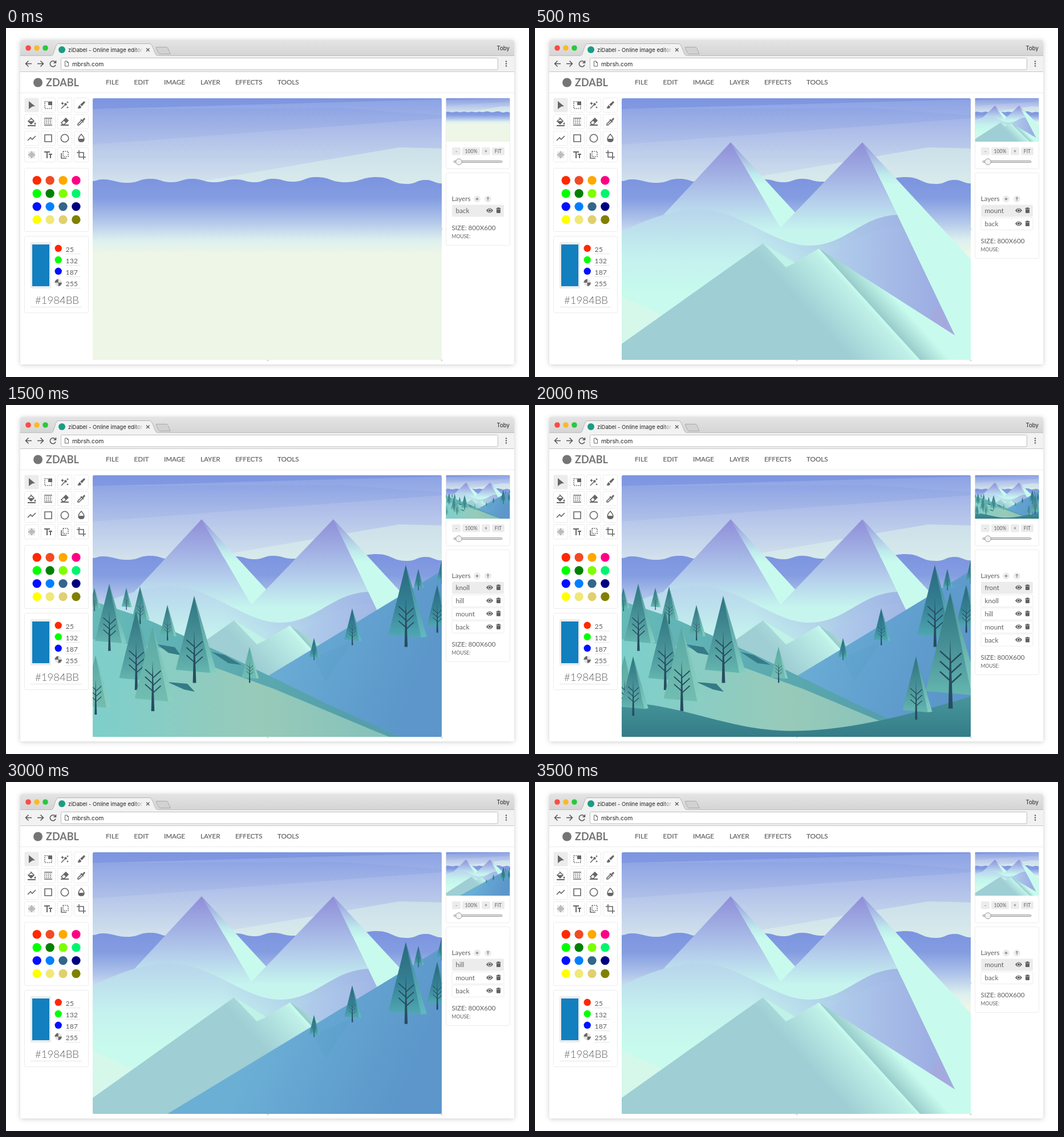
An HTML page for the animation above (4000 ms loop, 917 by 611 pixels).

```html
<!DOCTYPE html>
<html lang="en">
<meta charset="utf-8">
<title>Image editor</title>
<style>
html, body { margin: 0; width: 100%; height: 100%; overflow: hidden; background: #fff }
svg { display: block; font-family: Lato, sans-serif; fill: #616161 }
.chrome { font-family: Inter, sans-serif; fill: #222 }
.panel { fill: #fff; stroke: #ececec }
.soft { fill: #ececec }
.icon { fill: none; stroke: #666; stroke-width: 1.6 }
.icon .f { fill: #666; stroke: none }
.icon .d { stroke-dasharray: 1.8 1.6 }
</style>
<svg id="stage" width="917" height="611" viewBox="0 0 917 611"></svg>
<script>
const stage = document.getElementById('stage');
let defs = '';

// Helpers: each returns SVG markup
const gradient = (id, x1, y1, x2, y2, ...stops) => {
  defs += `<linearGradient id="${id}" gradientUnits="userSpaceOnUse" x1="${x1}" y1="${y1}" x2="${x2}" y2="${y2}">` +
    stops.map(([at, color, alpha = 1]) => `<stop offset="${at}" stop-color="${color}" stop-opacity="${alpha}"/>`).join('') +
    '</linearGradient>';
  return `url(#${id})`;
};
const poly = (points, fill, more = '') => `<polygon points="${points}" fill="${fill}" ${more}/>`;
const path = (d, fill = 'none', more = '') => `<path d="${d}" fill="${fill}" ${more}/>`;
const dot = (x, y, r, fill, more = '') => `<circle cx="${x}" cy="${y}" r="${r}" fill="${fill}" ${more}/>`;
const box = (x, y, w, h, cls = 'panel', r = 2) =>
  `<rect x="${x}" y="${y}" width="${w}" height="${h}" rx="${r}" class="${cls}"/>`;
const text = (x, y, size, s, more = '') => `<text x="${x}" y="${y}" font-size="${size}" ${more}>${s}</text>`;
const line = (x1, y1, x2, y2, color) => path(`M${x1},${y1}L${x2},${y2}`, 'none', `stroke="${color}"`);

// Smooth curve with level tangents at every crest and trough
const waves = points => points.map(([x, y], i) => {
  if (!i) return `M${x},${y}`;
  const [px, py] = points[i - 1], mid = (x + px) / 2;
  return `C${mid},${py} ${mid},${y} ${x},${y}`;
}).join('');

function tree(x, y, h, tone) {
  const branches = [.66, .76, .86].map(b => `M0,${b}L-.1,${b - .09}M0,${b + .03}L.11,${b - .07}`).join('');
  return `<g transform="translate(${x} ${y}) scale(${h})">` +
    poly('0,0 .21,1 .29,.99', `url(#${tone}Side)`) +
    poly('0,0 -.24,.96 .21,1', `url(#${tone})`) +
    poly('-.018,1.13 0,.45 .025,1.13', '#264d60') +
    path(branches, 'none', 'stroke="#264d60" stroke-width=".014"') + '</g>';
}
const trees = (tone, list) => list.map(t => tree(...t, tone)).join('');
gradient('cold', 0, 0, 0, 1, [0, '#28697c'], [.55, '#358094'], [1, '#50a9b3']);
gradient('coldSide', 0, 0, 0, 1, [0, '#3c8598'], [1, '#62b9c0']);
gradient('warm', 0, 0, 0, 1, [0, '#2f7480'], [.5, '#458f95'], [1, '#65b6b0']);
gradient('warmSide', 0, 0, 0, 1, [0, '#4b949a'], [1, '#83cec2']);
gradient('pale', 0, 0, 0, 1, [0, '#5aa8a4'], [1, '#72beb1']);
gradient('paleSide', 0, 0, 0, 1, [0, '#76beb5'], [1, '#8bd0c0']);

const mint = '#c8fbed';
const sky = gradient('sky', 0, 123, 0, 280, [0, '#859de4'], [.35, '#a3b5e6'], [.7, '#bccee9'], [1, '#d2e2eb']);
const lake = gradient('lake', 0, 262, 0, 396, [0, '#7c94e0'], [.27, '#849de1'], [.55, '#aec3ea'], [.82, '#ddf0ef'], [1, '#eef6e7']);
const face = gradient('face', 0, 200, 0, 355, [0, '#8f8dd8'], [.35, '#a1afe3'], [.65, '#b4cdec'], [1, '#c6f5ee']);
const lit = gradient('lit', 0, 200, 0, 275, [0, '#908fd9'], [.3, '#a5b5e4'], [.75, '#bfeaec'], [1, mint]);
const haze = gradient('haze', 0, 317, 0, 470, [0, '#b8d5ec'], [.55, '#c4f1ee'], [1, mint]);
const tint = gradient('tint', 380, 0, 670, 0, [0, '#9db2e4', 0], [1, '#9db2e4']);
const valley = gradient('valley', 440, 0, 700, 0, [0, '#bee4ef'], [.35, '#afcbeb'], [1, '#9daee3']);
const ridge = gradient('ridge', 495, 514, 560, 455, [0, '#9fced4'], [.9, '#bff0e7'], [1, mint]);
const strip = gradient('strip', 600, 498, 642, 460, [0, '#98cccb'], [.7, mint]);
const slope = gradient('slope', 430, 480, 680, 590, [0, '#6bafd5'], [.5, '#62a2d0'], [1, '#5c96ca']);
const bank = gradient('bank', 152, 0, 600, 0, [0, '#65bab9'], [1, '#559faa']);
const meadow = gradient('meadow', 152, 0, 640, 0, [0, '#7dcfcc'], [.6, '#98cab9'], [1, '#86c2bb']);
const near = gradient('near', 0, 500, 0, 581, [0, '#4a9a9e'], [1, '#347c88']);

const layers = [
  ['back',
    `<rect x="152" y="123" width="612" height="458" fill="${sky}"/>` +
    poly('152,123 764,123 764,125 152,142', '#7892e0', 'opacity=".6"') +
    poly('152,142 764,125 764,153 590,140', '#fff', 'opacity=".05"') +
    poly('152,204 764,158 764,290 152,290', '#fff', 'opacity=".1"') +
    poly('345,268 690,209 764,211 764,290 345,290', '#dcf2ec', 'opacity=".55"') +
    path(waves([[152, 268], [168, 265], [213, 271], [253, 264], [290, 270], [326, 264], [365, 270], [402, 265],
      [436, 270], [468, 264], [503, 269], [544, 261], [594, 270], [650, 261], [703, 273], [736, 266], [764, 272]]) +
      'V581H152Z', lake)],
  ['mount',
    poly('343,200 152,406 152,450 430,450 430,350', face) +
    poly('343,200 458,325 430,350', lit) +
    poly('574,200 764,405 764,581 736,538', lit) +
    poly('574,200 430,350 400,420 736,538', face) +
    ['haze', 'tint'].map(id => path('M152,357C205,328 260,316 290,317C360,319 420,381 480,381C545,381 570,330 635,327' +
      'L736,538L152,581Z', `url(#${id})`)).join('') +
    path('M430,386C475,415 515,397 560,372C595,352 625,347 645,348L736,538L498,420Z', valley) +
    poly('707,484 736,538 690,510', '#aaa9dc', 'opacity=".6"') +
    poly('152,470 222,502 152,553', '#d5f8eb') +
    poly('152,553 400,377 440,419 498,386 675,581 152,581', ridge) +
    poly('400,377 456,411 440,419', '#c0f2e8') +
    poly('498,386 736,538 764,556 764,581 675,581', strip)],
  ['hill',
    poly('283,581 764,290 764,581', slope) +
    poly('540,442 607,414 560,485', '#559dc2', 'opacity=".25"') +
    trees('cold', [[764, 272, 36], [723, 287, 33], [756, 315, 74], [701, 280, 127], [607, 356, 57], [540, 408, 34]])],
  ['knoll',
    path('M152,343L240,372L383,436L560,522L690,581H152Z', bank) +
    path('M152,410L270,425L470,497L640,568L672,581H152Z', meadow) +
    ['265,419 296,424 306,438 285,434', '360,432 384,438 413,455 390,452', '283,485 318,488 331,502 312,498']
      .map(p => poly(p, '#347b87')).join('') +
    trees('warm', [[155, 320, 36], [211, 320, 34], [235, 318, 58], [181, 313, 104], [283, 350, 55],
      [228, 360, 123], [330, 334, 135]]) +
    trees('pale', [[157, 438, 92], [427, 423, 56]]) +
    tree(257, 388, 131, 'pale')],
  ['front',
    path('M152,520C260,525 330,565 430,570S650,545 764,510V581H152Z', near) +
    trees('warm', [[172, 440, 92], [728, 328, 180], [668, 440, 98]])]
];

// Toolbar icons, drawn around the origin
const f = d => `<path class="f" d="${d}"/>`, s = d => `<path d="${d}"/>`, dash = d => `<path class="d" d="${d}"/>`;
const grid = [-5, -2.5, 0, 2.5, 5];
const icons = [
  f('M-5,-7L6,2L1,2.500L-5,7Z'),
  dash('M-6,-6H6V6H-6Z') + f('M0,-6H7V0H0Z'),
  s('M-6,6L3,-3') + f('M1,-4L4,-1L2,1L-1,-2ZM-4,-6l1,2 2,1-2,1-1,2-1-2-2-1 2-1ZM5,-7l.7,1.300 1.300.7-1.300.7L5,-3l-.7-1.300L3,-5l1.300-.7ZM5,2l.7,1.300 1.300.7-1.300.7L5,6l-.7-1.300L3,4l1.300-.7Z'),
  f('M5,-7L7,-5L1,2L-2,-1ZM-3,0L0,3C0,6 -4,7 -7,5C-5,5 -5,1 -3,0Z'),
  s('M-2,-7L4,-1L-1,4L-6,-1L-1,-5') + f('M-6,-1H4L-1,4ZM6,1q3,4 0,4q-3,0 0,-4ZM-7,6H7V8H-7Z'),
  s('M-7,-6H7M-7,6H7') + dash('M-7,-3H7M-7,0H7M-7,3H7'),
  s('M2,-6L6,-2L-1,5H-3L-6,2Z') + f('M2,-6L6,-2L2,2L-2,-2ZM-7,5H7V7H-7Z'),
  s('M-6,6V4L1,-3L3,-1L-4,6ZM-1,-4L4,1') + f('M2,-3L5,-7L7,-5L4,-1Z'),
  s('M-7,4L-2,-1L1,2L7,-4'),
  s('M-6,-6H6V6H-6Z'),
  '<circle r="6.700"/>',
  s('M0,-7C8,1 5,6 0,6S-8,1 0,-7Z') + f('M-5,1H5C5,8 -5,8 -5,1Z'),
  grid.map(x => grid.map(y => `<circle class="f" cx="${x}" cy="${y}" r="${x * x + y * y < 30 ? .9 : .5}"/>`).join('')).join(''),
  f('M-7,-6H3V-4H-1V6H-3V-4H-7ZM1,-2H7V0H5V6H3V0H1Z'),
  dash('M-3,-6H6V3H-3Z') + s('M-6,-3V6H3'),
  s('M-4,-8V4H8M-8,-4H4V8')
];
const palette = ('ff2800 f14a24 ffa800 ff0084 00ff00 008000 7fff00 00f56e ' +
  '0010ff 007fff 336688 000080 ffff00 f0e878 e0d070 808000').split(' ');
const cell = (i, x, y, step) => [x + i % 4 * step, y + (i >> 2) * step];

const bar = gradient('bar', 0, 21, 0, 48, [0, '#e4e4e4'], [1, '#d5d5d5']);
const fade = gradient('fade', 224, 0, 241, 0, [0, '#f2f2f2', 0], [1, '#f2f2f2']);

const browser =
  '<rect x="25" y="21" width="866" height="568" rx="4" fill="#fff" filter="url(#shadow)"/>' +
  path('M25,48V25a4,4 0 0 1 4,-4H887a4,4 0 0 1 4,4V48Z', bar) +
  '<path d="M25,48H891V76H25Z" fill="#f2f2f2"/>' +
  line(25, 48.5, 891, 48.5, '#bdbdbd') + line(25, 76.5, 891, 76.5, '#c6c6c6') +
  path('M80,49C84,48 86,29 91,27.500H252C258,28 260,48 266,49', '#f2f2f2', 'stroke="#b4b4b4"') +
  '<path d="M80,48.500H266V51H80Z" fill="#f2f2f2"/>' +
  path('M264,33.500H282Q284,34 288,45.500H270Q267,45 263,34Z', '#d2d2d2', 'stroke="#aaa"') +
  dot(39, 35, 4.8, '#fb4c45') + dot(54, 35, 4.8, '#fdb827') + dot(69, 35, 4.8, '#2ac83f') +
  dot(98, 38, 6, '#1c9b83') +
  '<g class="chrome">' + text(109, 41.5, 9.5, 'ziDabel - Online image editor') +
  `<rect x="224" y="30" width="18" height="16" fill="${fade}"/>` +
  '<rect x="241" y="30" width="5" height="16" fill="#f2f2f2"/>' +
  text(883, 39, 9.7, 'Toby', 'text-anchor="end"') +
  '<rect x="96.500" y="52.500" width="766" height="20.500" rx="2" fill="#fff" stroke="#bdbdbd"/>' +
  text(116, 66.5, 10.4, 'mbrsh.com') + '</g>' +
  path('M246,35.500l5.500,5.500m0,-5.500l-5.500,5.500', 'none', 'stroke="#555" stroke-width="1.200"') +
  path('M45,62.500H34.500m5,-5l-5,5l5,5M55,62.500H65.500m-5,-5l5,5l-5,5M86.500,60A5,5 0 1 0 87,64.500M87.500,57V61H83.500',
    'none', 'stroke="#555" stroke-width="1.500"') +
  path('M103.500,58h3.500l2.500,2.500v6.500h-6ZM107,58v2.500h2.500', 'none', 'stroke="#666"') +
  [58.5, 62.5, 66.5].map(y => dot(877, y, 1.2, '#555')).join('') +
  line(25, 113.5, 891, 113.5, '#ebebeb');

const editor =
  dot(56, 95.5, 8, '#757575') + text(70, 101.5, 18, 'ZDABL', 'font-weight="700" fill="#757575"') +
  [['FILE', 175], ['EDIT', 224.5], ['IMAGE', 277], ['LAYER', 341], ['EFFECTS', 402], ['TOOLS', 476]]
    .map(([name, x]) => text(x, 99, 11.7, name, 'stroke="#616161" stroke-width=".2"')).join('') +
  icons.map((icon, i) => {
    const [x, y] = cell(i, 45, 135, 29);
    return box(x - 12.5, y - 12.5, 25, 25, i ? 'panel' : 'soft') + `<g class="icon" transform="translate(${x} ${y})">${icon}</g>`;
  }).join('') +
  box(32.5, 245.5, 112, 111) +
  palette.map((c, i) => dot(...cell(i, 54.2, 266.8, 22.9), 7.7, '#' + c)).join('') +
  box(32.5, 364.5, 112, 134) + box(43, 375, 36, 81, 'soft') +
  '<rect x="46" y="379" width="30" height="73" fill="#127fbf"/>' +
  ['#ff2800', '#00ff00', '#0010ff'].map((c, i) => dot(91.7, 385.8 + i * 20, 6.2, c)).join('') +
  dot(91.7, 445.8, 6.2, '#e4e4e4') + path('M91.700,445.800V439.600A6.200,6.200 0 0 0 85.500,445.800ZH97.900A6.200,6.200 0 0 1 91.700,452Z', '#666') +
  [25, 132, 187, 255].map((v, i) => text(104.5, 391.7 + i * 20, 12.3, v) + line(104, 395.5 + i * 20, 131, 395.5 + i * 20, '#e4e4e4')).join('') +
  text(51, 483, 18.5, '#1984BB', 'font-weight="300"') + line(43, 488.5, 133, 488.5, '#e4e4e4');

const side =
  box(771.5, 122.5, 112, 124) +
  [['-', 782, 15], ['100%', 800, 31], ['+', 834, 15], ['FIT', 852, 22]].map(([label, x, w]) =>
    box(x, 209, w, 13.5, 'soft') + text(x + w / 2, 218.8, 8.6, label, 'text-anchor="middle"')).join('') +
  '<rect x="785" y="232.500" width="85" height="3" rx="1.500" fill="#ddd" stroke="#a0a0a0"/>' +
  dot(794, 234.2, 5.3, '#f3f3f3', 'stroke="#999"') +
  '<rect id="layerPanel" x="771.500" y="253.500" width="112" rx="2" class="panel"/>' +
  text(781.5, 302.7, 11.7, 'Layers') +
  dot(826, 299.3, 6, '#ececec') + dot(845, 299.3, 6, '#ececec') +
  path('M823.500,299.300h5M826,296.800v5M845,302.300v-6m-2,2l2,-2l2,2', 'none', 'stroke="#666"');

const row = ([name], i) => `<g class="row">` +
  '<rect x="782" y="309.500" width="91" height="21" rx="2" class="panel"/>' +
  text(788.5, 324.3, 11.7, name) +
  path('M842,319.500Q848,311.500 854,319.500Q848,327.500 842,319.500Z', '#616161') +
  dot(848, 319.5, 2.6, 'none', 'stroke="#fff"') +
  path('M859.500,315.500h8v1.500h-8ZM861.500,314.300h4v1.500h-4ZM860,317.500h7v5.500q0,1 -1,1h-5q-1,0 -1,-1Z', '#616161') + '</g>';

const scene = '<g id="scene" clip-path="url(#frame)">' +
  layers.map(([, art]) => `<g class="layer">${art}</g>`).join('') + '</g>';
const handles = [[459, 582], [764, 352], [764, 582]].map(([x, y]) => dot(x, y, 1.8, '#dcdcdc')).join('');

defs += '<filter id="shadow" x="-10%" y="-10%" width="120%" height="120%"><feDropShadow dx="0" dy="1" stdDeviation="4" flood-opacity=".2"/></filter>' +
  '<clipPath id="frame"><rect x="152" y="123" width="612" height="458.500" rx="3"/></clipPath>';
stage.innerHTML = `<defs>${defs}</defs>` + browser + editor + handles + scene + side +
  '<use href="#scene" transform="translate(771.500 123) scale(.183 .166) translate(-152 -123)"/>' +
  layers.map(row).join('') +
  `<g id="info">${text(781.5, 354.3, 11.6, 'SIZE: 800X600')}${text(781.5, 368, 8.5, 'MOUSE:')}</g>`;

const layerNodes = stage.querySelectorAll('.layer'), rows = stage.querySelectorAll('.row');
const layerPanel = document.getElementById('layerPanel'), info = document.getElementById('info');
let shown = 0;

function render(now) {
  const step = Math.floor(now % 4000 / 500);
  const count = 5 - Math.abs(step - 4);
  if (count !== shown) {
    shown = count;
    layerNodes.forEach((node, i) => node.style.display = i < count ? '' : 'none');
    rows.forEach((node, i) => {
      node.style.display = i < count ? '' : 'none';
      node.setAttribute('transform', `translate(0 ${(count - 1 - i) * 22.9})`);
      node.firstChild.setAttribute('class', i === count - 1 ? 'soft' : 'panel');
    });
    layerPanel.setAttribute('height', 127 + (count - 1) * 22.9);
    info.setAttribute('transform', `translate(0 ${(count - 1) * 22.9})`);
  }
  requestAnimationFrame(render);
}
const start = performance.now();
render(0);
requestAnimationFrame(function first() { render(performance.now() - start); });
</script>
</html>
```
